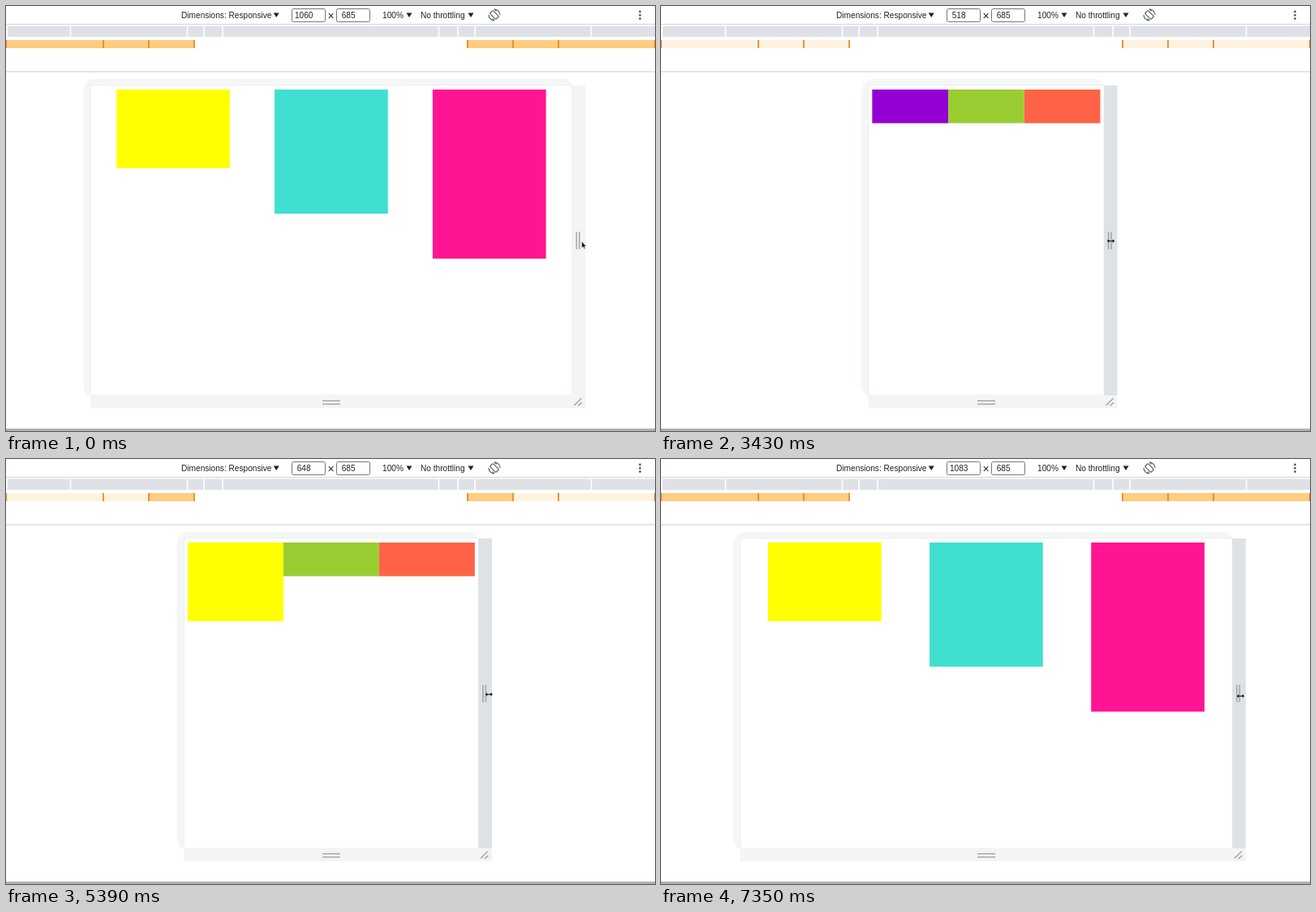
An HTML page for the animation above (7420 ms loop, 800 px wide and 524 px high).

```html
<!DOCTYPE html>
<html lang="en">
<head>
<meta charset="utf-8">
<title>Responsive boxes</title>
<style>
html, body { margin: 0; width: 100%; height: 100%; overflow: hidden; background: #fff; }
svg { display: block; width: 800px; height: 524px; }
text { font: 10.15px "Liberation Sans", Arial, sans-serif; fill: #222; }
.mid { text-anchor: middle; }
.field { fill: #fff; stroke: #767676; }
.grip { fill: none; stroke: #a6a8ab; stroke-width: 1.6; }
.icon { fill: none; stroke: #5a5d61; stroke-width: 1.2; }
</style>
</head>
<body>
<svg id="stage" viewBox="0 0 800 524">
  <g id="toolbar">
    <text x="216" y="15">Dimensions: Responsive</text>
    <rect class="field" x="352.5" y="3.5" width="41" height="16" rx="2"/>
    <rect class="field" x="407.5" y="3.5" width="41" height="16" rx="2"/>
    <text id="width" class="mid" x="367.2" y="15"></text>
    <text class="mid" x="400.5" y="17" style="font-size:14px">×</text>
    <text class="mid" x="422.2" y="15">685</text>
    <text x="464" y="15">100%</text>
    <text x="511" y="15">No throttling</text>
    <path fill="#222" d="M329.7 8.5h7l-3.5 5.5zM493.5 8.5h7l-3.5 5.5zM569.5 8.5h7l-3.5 5.5z"/>
    <g class="icon" transform="translate(602 11)">
      <rect x="-2.7" y="-5.2" width="5.4" height="10.4" rx="1" transform="rotate(-45)"/>
      <path d="M0 -7A7 7 0 0 1 7 0M0 7A7 7 0 0 1 -7 0M0 -7l2.6 2.4M0 7l-2.6 -2.4"/>
    </g>
    <g fill="#55585c">
      <circle cx="781.5" cy="7" r="1.4"/><circle cx="781.5" cy="11.3" r="1.4"/><circle cx="781.5" cy="15.6" r="1.4"/>
    </g>
    <rect y="22" width="800" height="1" fill="#d3d5d8"/>
  </g>
  <g id="rulers"><rect x="2" y="24.5" width="798" height="13.5" fill="#dee2e6"/></g>
  <rect y="80.5" width="800" height="1" fill="#c9cbcd"/>
  <rect y="521" width="800" height="3" fill="#b1b1b1"/>
  <path id="shade" fill="#f5f6f6"/>
  <rect id="page" y="97.5" height="382.5" fill="#fff" stroke="#e9ebec" stroke-width="0.8"/>
  <rect id="foot" y="480" height="16" fill="#f2f4f5"/>
  <rect id="side" y="98" width="16.5" height="382"/>
  <path class="grip" d="M390 486.7h22M390 490.7h22"/>
  <path id="sideGrip" class="grip" d="M5.5 278.5v21.5M9 278.5v21.5"/>
  <path id="corner" class="grip" d="M2.5 492.5l9 -8.8M7.5 493l4.5 -4.2"/>
  <g id="boxes"></g>
  <path id="arrow" d="M0 0V8.2L1.9 6.5L3.1 9.2L4.4 8.6L3.2 6H5.6Z" fill="#111" stroke="#fff" stroke-width="0.5"/>
  <path id="resize" d="M-4.8 0L-2 -2.7V-0.8H2V-2.7L4.8 0L2 2.7V0.8H-2V2.7Z" fill="#000" stroke="#fff" stroke-width="0.4"/>
</svg>
<script>
const LOOP = 7420, STEP = 70, SCALE = 0.56, CENTER = 401, TOP = 103;
const $ = id => document.getElementById(id);
const set = (el, attrs) => { for (const k in attrs) el.setAttribute(k, attrs[k]); };
const addRect = (parent, attrs) => {
  const el = document.createElementNS("http://www.w3.org/2000/svg", "rect");
  set(el, attrs);
  return parent.appendChild(el);
};

// [ms, viewport width, pointer offset from the viewport edge, pointer y]
const drag = [
  [1470, 1060, 5, 291.5], [1540, 1060, 5, 291.5], [1750, 1048, 5.8, 291.5],
  [2520, 796, 8, 290.5], [3250, 550, 8.3, 290], [3700, 492, 9, 289.5],
  [4200, 518, 10.8, 289.5], [5390, 648, 12.8, 290.2], [6230, 831, 16.5, 291.2],
  [7350, 1083, 10.2, 292.2]
];
// [ms, pointer x, pointer y] before the drag
const approach = [[0, 709.7, 290.3], [350, 710.5, 290.5], [490, 713, 293], [700, 706, 291], [1120, 706, 291], [1470, 702.8, 291.5]];

// Monotone cubic interpolation of one table column.
function sample(table, col, t) {
  const last = table.length - 1;
  if (t <= table[0][0]) return table[0][col];
  if (t >= table[last][0]) return table[last][col];
  const i = table.findIndex(row => row[0] > t) - 1;
  const slope = k => (table[k + 1][col] - table[k][col]) / (table[k + 1][0] - table[k][0]);
  const tangent = k => {
    if (k === 0) return slope(0);
    if (k === last) return slope(last - 1);
    const a = slope(k - 1), b = slope(k);
    return a * b > 0 ? 2 * a * b / (a + b) : 0;
  };
  const h = table[i + 1][0] - table[i][0], u = (t - table[i][0]) / h, v = 1 - u;
  return v * v * (1 + 2 * u) * table[i][col] + u * u * (3 - 2 * u) * table[i + 1][col]
    + h * u * v * (v * tangent(i) - u * tangent(i + 1));
}

for (const x of [79.5, 223.5, 244, 267, 533.5, 557, 578, 721.5])
  addRect($("rulers"), { x: x - 0.8, y: 24.5, width: 1.6, height: 13.5, fill: "#fff" });

// Mirrored media-query segments: [min width, left x, right x, length]
const queries = [[600, 176, 569, 56], [800, 120, 625, 56], [1000, 0, 681, 120]].map(([min, left, right, width]) => ({
  min,
  bars: [left, right].map(x => addRect($("rulers"), { x, y: 42, width, height: 10 }))
}));
for (const x of [0.2, 120, 176, 232, 569, 625, 681, 799.8])
  addRect($("rulers"), { x: x - 0.9, y: 42, width: 1.8, height: 10, fill: "#ee8a22" });

const boxes = [
  { min: 600, small: "#9400d3", large: "#ffff00", height: 97 },
  { min: 800, small: "#9acd32", large: "#40e0d0", height: 153 },
  { min: 1000, small: "#ff6347", large: "#ff1493", height: 208.5 }
].map(box => ({ ...box, el: addRect($("boxes"), { y: TOP }) }));

function draw(t) {
  const w = Math.round(sample(drag, 1, t));
  const half = w * SCALE / 2, left = CENTER - half, right = CENTER + half;
  const hover = t >= 1400;

  $("width").textContent = w;
  for (const q of queries)
    for (const bar of q.bars) set(bar, { fill: w >= q.min ? "#ffcc80" : "#fff3e0" });

  set($("shade"), { d: `M${left} 482Q${left - 9} 478 ${left - 9} 464V108Q${left - 8} 89.5 ${left + 8} 89.5H${right - 9}Q${right - 3} 90 ${right} 98H${left}Z` });
  set($("page"), { x: left, width: 2 * half });
  set($("foot"), { x: left, width: 2 * half + 16.5 });
  set($("side"), { x: right, fill: hover ? "#dee2e6" : "#f2f4f5" });
  for (const id of ["sideGrip", "corner"]) set($(id), { transform: `translate(${right})` });

  const slot = (w - 16) * SCALE / 3, width = Math.min(139.7, slot);
  boxes.forEach((box, i) => {
    const big = w >= box.min;
    set(box.el, {
      x: CENTER - 0.1 + (i - 1) * slot - width / 2, width,
      height: big ? box.height : 41.5, fill: big ? box.large : box.small
    });
  });

  const dragging = t >= 1470;
  const x = dragging ? right + sample(drag, 2, t) : sample(approach, 1, t);
  const y = dragging ? sample(drag, 3, t) : sample(approach, 2, t);
  set($("arrow"), { transform: `translate(${x} ${y})`, visibility: hover ? "hidden" : "visible" });
  set($("resize"), { transform: `translate(${x} ${y})`, visibility: hover ? "visible" : "hidden" });
}

const start = performance.now();
function tick() {
  const t = (performance.now() - start) % LOOP;
  draw(Math.floor(t / STEP) * STEP);
  requestAnimationFrame(tick);
}
tick();
</script>
</body>
</html>
```
